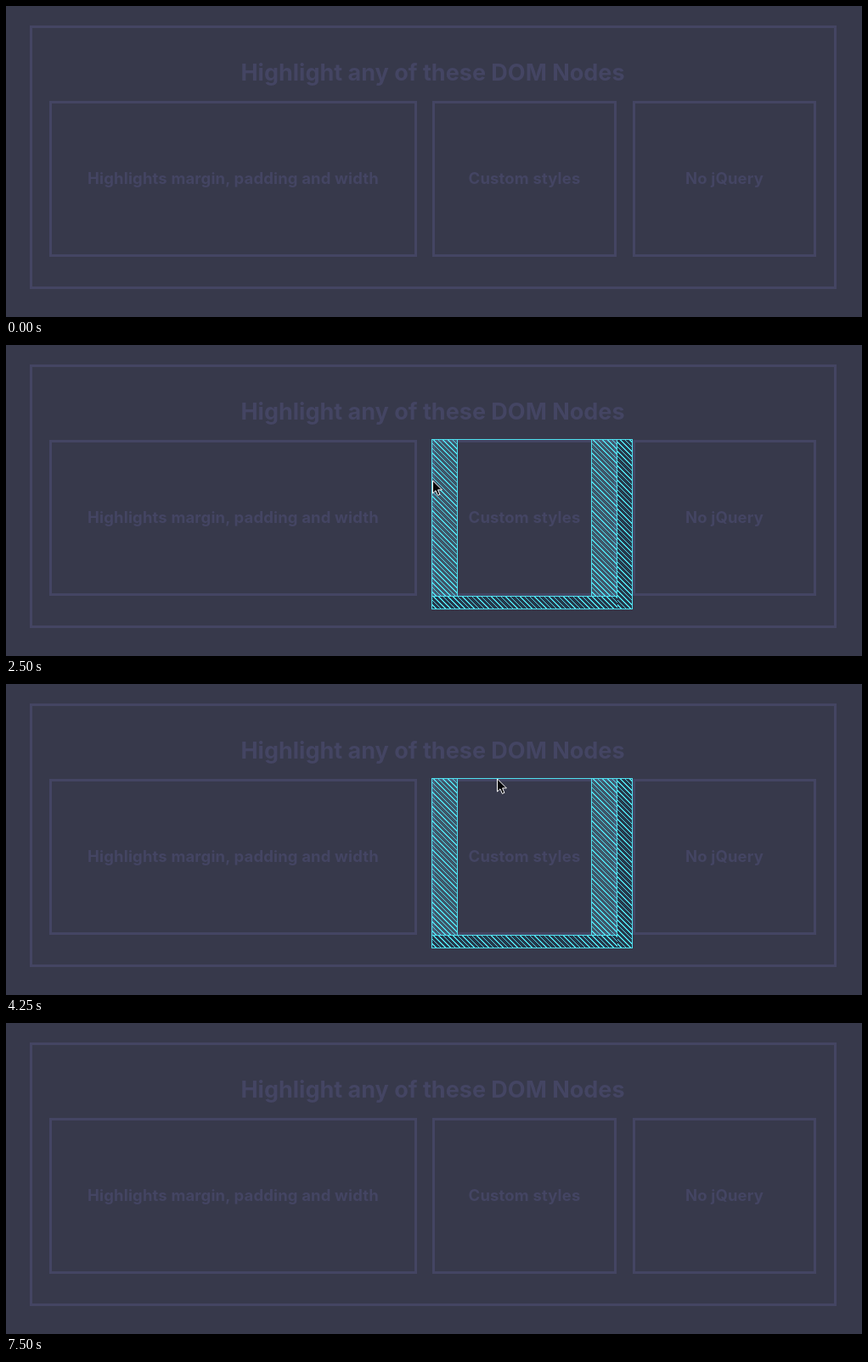
These frames come from a looping animation (1008 px wide and 367 px high, 8.25 s). An HTML page:

```html
<!DOCTYPE html>
<html lang="en">
<head>
<meta charset="utf-8">
<title>DOM node highlighter</title>
<style>
  html, body { margin: 0; width: 100%; height: 100%; overflow: hidden; background: #37394b; }
  #stage {
    position: relative; width: 1008px; height: 367px; overflow: hidden;
    font-family: Inter, "Open Sans", sans-serif; font-weight: 700; color: #444563;
  }
  #stage div { position: absolute; box-sizing: border-box; }
  .frame { border: 3px solid #444563; }
  .title, .label { text-align: center; white-space: nowrap; }
  .title { font-size: 27px; line-height: 27px; }
  .label { font-size: 18.5px; line-height: 18px; letter-spacing: .15px; }

  .mark { inset: 0; opacity: 0; animation: 8250ms step-end infinite; }
  .edge { border: 1px solid #50e0ef; }
  .pad, .margin {
    background-image: repeating-linear-gradient(45deg, #50dcec 0 1px, transparent 1px 4px);
  }
  .pad { background-color: rgba(97, 218, 235, .18); }
  .margin { background-color: #25384a; }

  #outer { animation-name: outer; }
  #cell { animation-name: cell; }
  #text { animation-name: text; }
  #head { animation-name: head; }
  @keyframes outer { 0%, 30.3% { opacity: 0 } 21.21% { opacity: 1 } }
  @keyframes cell { 0%, 39.39%, 54.54% { opacity: 0 } 30.3%, 51.51% { opacity: 1 } }
  @keyframes text { 0%, 51.51% { opacity: 0 } 39.39% { opacity: 1 } }
  @keyframes head { 0%, 84.84% { opacity: 0 } 54.54% { opacity: 1 } }

  #cursor {
    position: absolute; left: 0; top: 0; width: 13px; height: 20px;
    animation: cursor 8250ms step-end infinite;
  }
  @keyframes cursor {
    0%, 84.84%, 100% { transform: translate(-40px, 0) }
    9.09% { transform: translate(460px, 82px) }
    12.12% { transform: translate(468px, 88px) }
    15.15% { transform: translate(470px, 131px) }
    18.18% { transform: translate(483px, 159px) }
    21.21% { transform: translate(484px, 159px) }
    24.24% { transform: translate(486px, 159px) }
    27.27% { transform: translate(490px, 159px) }
    30.3% { transform: translate(502px, 159px) }
    33.33% { transform: translate(513px, 160px) }
    39.39% { transform: translate(547px, 159px) }
    42.42% { transform: translate(590px, 162px) }
    45.45% { transform: translate(585px, 150px) }
    48.48% { transform: translate(578px, 126px) }
    51.51% { transform: translate(578px, 111px) }
    54.54% { transform: translate(577px, 100px) }
    60.6% { transform: translate(566px, 70px) }
    63.63% { transform: translate(565px, 69px) }
    78.78% { transform: translate(561px, 68px) }
    81.81% { transform: translate(562px, 68px) }
  }
</style>
</head>
<body>
<div id="stage">
  <div id="page"></div>
  <div class="mark" id="outer"></div>
  <div class="mark" id="cell"></div>
  <div class="mark" id="text"></div>
  <div class="mark" id="head"></div>
  <svg id="cursor" viewBox="0 0 13 20">
    <path d="M.5 1V16L4 12.8L6.4 18.4L8.9 17.3L6.6 11.9H11.4Z" fill="#050508" stroke="#fff"/>
  </svg>
</div>
<script>
  function add(parent, type, x, y, w, h, text = "") {
    const el = document.createElement("div");
    el.className = type;
    el.style.cssText = `left:${x}px;top:${y}px;width:${w}px;height:${h}px`;
    el.textContent = text;
    document.getElementById(parent).append(el);
  }

  add("page", "frame", 28, 23, 950, 311);
  add("page", "title", 50, 65, 905, 27, "Highlight any of these DOM Nodes");
  const cells = [
    [51, 433, "Highlights margin, padding and width"],
    [502, 217, "Custom styles"],
    [738, 216, "No jQuery"]
  ];
  for (const [x, w, text] of cells) {
    add("page", "frame", x, 112, w, 184);
    add("page", "label", x, 194, w, 18, text);
  }

  // Container: side paddings overlap in the corners
  for (const [y, h] of [[0, 23], [334, 33]]) add("outer", "margin", 27, y, 952, h);
  for (const y of [22, 314]) add("outer", "pad", 27, y, 952, 21);
  for (const x of [27, 958]) add("outer", "pad", x, 22, 21, 313);
  add("outer", "edge", 27, -2, 952, 371);
  add("outer", "edge", 27, 22, 952, 313);
  add("outer", "edge", 47, 42, 912, 273);

  // Middle cell
  add("cell", "margin", 719, 111, 19, 201);
  add("cell", "margin", 501, 296, 219, 16);
  for (const x of [501, 689]) add("cell", "pad", x, 111, 31, 186);
  add("cell", "edge", 501, 111, 237, 201);
  add("cell", "edge", 501, 111, 219, 186);
  add("cell", "edge", 531, 111, 159, 186);

  // Label of the middle cell
  for (const y of [114, 213]) add("text", "pad", 534, y, 153, 81);
  add("text", "edge", 534, 114, 153, 180);
  add("text", "edge", 534, 194, 153, 20);

  // Heading
  for (const y of [45, 104]) add("head", "margin", 50, y, 906, 9);
  for (const y of [53, 92]) add("head", "pad", 50, y, 906, 13);
  add("head", "edge", 50, 45, 906, 68);
  add("head", "edge", 50, 53, 906, 52);
  add("head", "edge", 50, 65, 906, 28);
</script>
</body>
</html>
```
